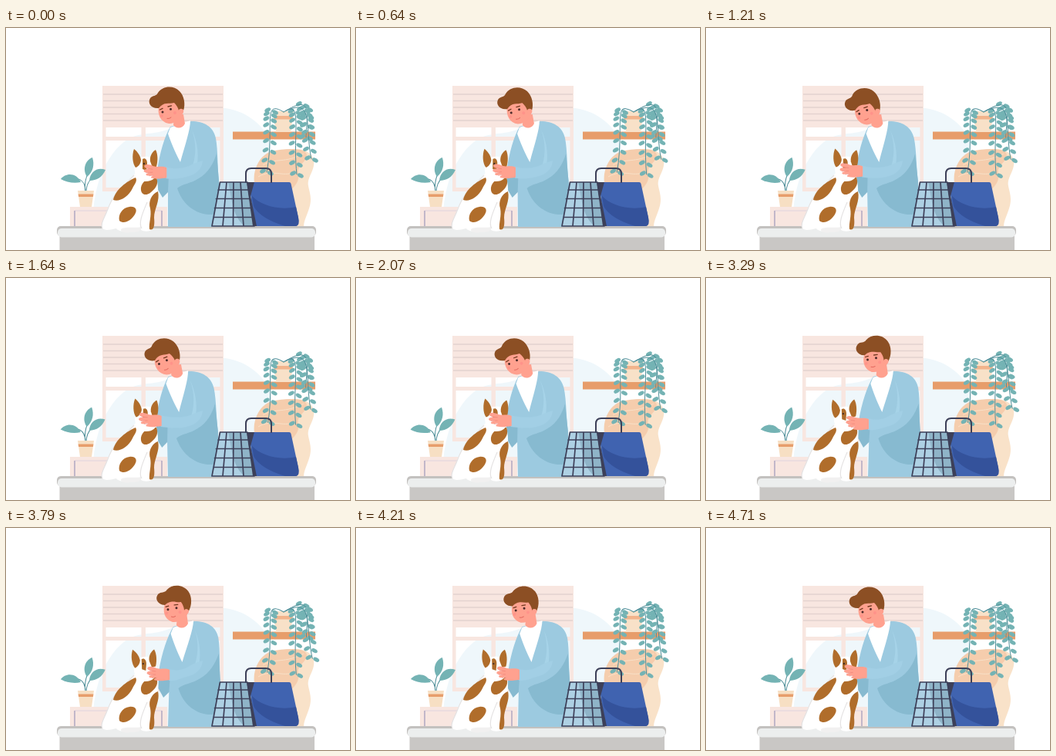
Animation of 446 by 288 pixels, one loop 4.78 s. Source, as an HTML page:

```html
<!DOCTYPE html>
<html lang="en">
<head>
<meta charset="utf-8">
<title>Man petting a dog</title>
<style>
html, body { margin: 0; width: 100%; height: 100%; overflow: hidden; background: #fff; }
svg { display: block; width: 100%; height: 100%; }
.pink { fill: #f8e6e0; }
.teal { fill: #74b3b4; }
.stem { fill: none; stroke: #4f8f99; stroke-width: 1; stroke-linecap: round; }
.coat { fill: #9ccae0; }
.shade { fill: #87bad0; }
.skin { fill: #ffa18f; }
.hair { fill: #8c4f24; }
.brown { fill: #b06d2b; }
.dark { fill: none; stroke: #3d4059; stroke-width: 2; stroke-linecap: round; stroke-linejoin: round; }
</style>
</head>
<body>
<svg viewBox="0 0 446 288">
  <!-- room -->
  <path fill="#eff7fb" d="M112 258C113 218 120 190 135 168C142 157 150 149 160 143C178 134 200 140 220 126C240 110 262 102 284 104C308 107 330 122 340 142C350 170 350 220 346 258Z"/>
  <path class="pink" d="M125 75H282V129H125Z"/>
  <path class="pink" fill-rule="evenodd" d="M125 129H282V212H125ZM129.500 129V141H175.500V129ZM181 129V141H277.500V129ZM129.500 146V207H175.500V146ZM181 146V207H277.500V146Z"/>
  <path stroke="#e4d2cf" stroke-width="1.300" d="M126 86H281M126 94.500H281M126 103H281M126 111.500H281M126 120H281"/>
  <path class="pink" d="M83 232H209V258H83Z"/>
  <path fill="none" stroke="#d9cfdc" stroke-width=".8" d="M89 237H202"/>
  <path fill="none" stroke="#b5acc4" stroke-width="1.600" d="M89 237V258M202 237V258"/>

  <!-- small plant -->
  <g id="plant">
    <path class="stem" d="M103 213C103 203 100 198 94 196M103 213C101 202 104 194 106 189M104 213C104 204 107 199 112 194"/>
    <path class="teal" d="M71 196C77 188 91 187 97 200C88 202 78 200 71 196Z"/>
    <path class="teal" d="M112 168C102 172 99 184 105 193C113 187 115 177 112 168Z"/>
    <path class="teal" d="M129 184C118 180 109 187 108 198C118 198 125 193 129 184Z"/>
  </g>
  <path fill="#f7dfc3" d="M93 211H114L111 232H96Z"/>
  <path fill="#e79d6b" d="M93.600 215.500H113.400L112.900 219H94.100Z"/>

  <!-- shelf corner -->
  <path fill="#f9e2c9" d="M350 160C375 154 396 156 399 172C401 185 390 193 392 205C394 215 397 222 393 234C390 244 386 250 386 258H340Z"/>
  <path fill="#f5cdad" d="M322 200C320 186 327 166 344 160C362 156 388 155 390 164C390 175 376 178 379 190C381 200 372 208 365 214H330Z"/>
  <path fill="none" stroke="#f9e2c9" d="M333 178C348 168 362 176 386 163M327 193C346 182 358 194 374 187"/>
  <path fill="#e79d6b" d="M294 134.500H401V144.500H294Z"/>
  <path fill="#f8e1c8" d="M346 108H373L369 135H350Z"/>
  <path fill="#f2b48c" d="M347 114H372L371.400 118.500H347.700Z"/>
  <g id="vines"></g>

  <!-- table -->
  <path fill="#c9c7c5" d="M69.500 268H400V288H69.500Z"/>
  <rect x="66" y="257" width="336" height="13" rx="5" fill="#c3c1bf"/>

  <!-- man -->
  <g id="body">
    <path class="coat" d="M213 128C206 140 199 162 196 186L197 207L210 213L210 258H277C278 235 277 215 276 198C274 180 275 160 272 143C269 128 257 121 240 121Z"/>
    <path class="shade" d="M196 192L211 190L210 213L203 220L196 208Z"/>
    <path class="shade" d="M273 163C269 176 262 188 250 195C240 202 228 202 222 208C228 226 242 240 262 242H277L276 198Z"/>
    <path fill="#fff" d="M213 129L239 120C239 132 232 152 226 174C219 161 213 146 210 137Z"/>
    <path fill="#a6d3e8" d="M241 132C247 148 247 168 240 184L246 184C251 170 249 148 241 132Z"/>
    <path class="skin" d="M218 113L230 112L232 124C229 131 220 131 217 126Z"/>
    <g id="head">
      <path class="skin" d="M198 101C196 112 200 122 211 124C221 124 230 116 230 105L223 92L203 92Z"/>
      <path class="hair" d="M198 104C188 105 183 97 187 91C190 87 195 89 197 84C203 75 217 74 225 82C231 88 233 99 230 107C228 110 226 110 224 107C223 103 221 100 218 97C211 99 205 95 198 104Z"/>
      <circle class="skin" cx="227" cy="108" r="3.200"/>
      <path fill="none" stroke="#70391f" stroke-width="1.300" stroke-linecap="round" d="M199.500 106L203 104.300M210 102L214.500 100.800"/>
      <g fill="#4c2b2a"><circle cx="203" cy="109" r="1.500"/><circle cx="213.500" cy="105.300" r="1.500"/></g>
      <g fill="#ff938a"><circle cx="202" cy="114" r="1.800"/><circle cx="219" cy="110" r="2"/></g>
      <path fill="none" stroke="#e2695f" stroke-width="1" stroke-linecap="round" d="M209 117.500Q212 118 214 116"/>
    </g>
  </g>
  <rect x="67" y="260" width="334" height="11.500" rx="5" fill="#eceeee"/>

  <!-- dog -->
  <path fill="#fff" d="M168 188C159 199 140 212 132 234C128 246 121 255 125 260C130 264 138 261 143 260C145 265 166 266 174 261C176 264 186 265 190 261L191 240C198 222 199 207 194 190Z"/>
  <path fill="#f1f0f0" d="M149 261C154 257 166 260 175 258C176 263 172 265 162 265C154 266 148 265 149 261Z"/>
  <path fill="none" stroke="#e4e2e2" stroke-width="1.200" d="M166 191C157 201 139 214 132 235C127 248 122 254 125 260M176 260C171 253 178 238 183 226"/>
  <path class="brown" d="M168 194C157 199 142 209 139 223C147 226 159 219 164 208C166 203 171 199 168 194Z"/>
  <path class="brown" d="M175 207C176 199 186 192 195 194C198 202 195 207 188 213C181 219 174 216 175 207Z"/>
  <path class="brown" d="M147 250C145 242 151 233 160 232C168 231 171 236 167 242C162 250 153 255 147 250Z"/>
  <path class="brown" d="M197 212C189 215 184 225 187 234C189 244 185 253 186 261C192 264 193 255 192 246C192 235 200 224 197 212Z"/>
  <g id="dogHead">
    <path fill="#fff" d="M167 178C168 169 175 166 184 167C193 167 197 176 196 184C196 194 190 199 181 199C171 199 165 190 167 178Z"/>
    <path class="brown" d="M166 157C163 165 164 176 168 181C172 180 175 175 175 171C174 165 170 160 166 157Z"/>
    <path class="brown" d="M194 158C189 161 186 167 187 173L190 181L195 180C197 172 197 164 194 158Z"/>
    <path class="brown" d="M177 170C180 168 183 170 183 176L182 185L177 183Z"/>
    <circle cx="179" cy="176" r="1.200" fill="#493128"/>
  </g>

  <!-- petting arm -->
  <path id="sleeve" fill="#a2cfe5"/>
  <g id="hand">
    <path class="skin" d="M208 181C202 178 197 181 191 179C185 176 179 176 179 179.500C180 182 185 182 187 183C183 182.500 177.500 182.500 178.500 186C180 188 185 187 187 187C183 188 179.500 189 182 191C185 192 189 190 191 191C188 192 186.500 194 189 194.500C195 196 202 195 208 194Z"/>
    <path fill="none" stroke="#ee8479" stroke-width=".7" d="M182 182L190 183M181 187.500L190 187M185 191.500L191 191"/>
  </g>

  <!-- carrier -->
  <path fill="#4063b0" d="M315 200H367Q369 200 369.500 202L379 246Q381 256 376 257H322Z"/>
  <path fill="#34529b" d="M319 218C330 230 354 237 376 232L379 246Q381 256 376 257H362C345 252 327 243 321 231Z"/>
  <path fill="#aed1e4" d="M277 200H314L323 257H267Z"/>
  <path fill="#8fb4c8" d="M288 200H314L323 257H309C292 242 293 219 288 200Z"/>
  <path fill="#3d4059" d="M312 200H322L317 218L325 257H320Z"/>
  <path class="dark" d="M311 200V189Q311 182 318 182H337Q344 182 344 189V200"/>
  <path class="dark" stroke-width="1.700" style="stroke-width: 1.7" d="M277.500 200H313L322 257H267ZM286 200L281 257M295 200L294.500 257M304 200L308 257M275 210H314M272.500 221.500H316M270.500 233.500H318M269 245.500H320"/>
</svg>
<script>
const $ = id => document.getElementById(id);
const LOOP = 4780, STEPS = 67;

// Control points of each hanging stem, number of leaf pairs, and sway in degrees.
const vines = [
  { p: [[360, 109], [331, 91], [349, 130], [338, 187]], n: 9, sway: s => -1.6 * s },
  { p: [[360, 109], [386, 91], [371, 135], [377, 190]], n: 9, sway: s => 1.3 * s },
  { p: [[362, 108], [398, 85], [390, 112], [389, 142]], n: 5, sway: (s, lean) => -.1 * lean },
  { p: [[364, 107], [400, 90], [387, 130], [396, 170]], n: 8, sway: (s, lean) => -.14 * lean }
];

function bezier(p, u) {
  const v = 1 - u;
  return [0, 1].map(i => v ** 3 * p[0][i] + 3 * v * v * u * p[1][i] + 3 * v * u * u * p[2][i] + u ** 3 * p[3][i]);
}

$('vines').innerHTML = vines.map(({ p, n }) => {
  let leaves = '';
  for (let i = 0; i < n; i++) {
    const [x, y] = bezier(p, .32 + .68 * i / (n - 1));
    for (const side of [-1, 1])
      leaves += `<ellipse class="teal" rx="4.200" ry="2.500" transform="translate(${x + side * 4.900} ${y + side * 1.500}) rotate(${side * 30})"/>`;
  }
  return `<g>${leaves}<path class="stem" d="M${p[0]}C${p.slice(1)}"/></g>`;
}).join('');

// Eased position between [time, value] keys.
const keys = [[0, 0], [1350, -6], [2000, -6], [3450, 8.5], [3850, 8.5], [4700, 0], [LOOP, 0]];
function leanAt(t) {
  t = (t + LOOP) % LOOP;
  const i = keys.findIndex(k => k[0] > t);
  const [t0, a] = keys[i - 1], [t1, b] = keys[i];
  const u = (t - t0) / (t1 - t0);
  return a + (b - a) * u * u * (3 - 2 * u);
}

const set = (el, transform) => el.setAttribute('transform', transform);

function draw(now) {
  const t = Math.floor(now % LOOP / LOOP * STEPS) * LOOP / STEPS;
  const lean = leanAt(t), reach = leanAt(t - 220);
  const swell = (1 - Math.cos(2 * Math.PI * t / LOOP)) / 2;
  const skew = lean * .0035;

  set($('body'), `matrix(1 0 ${-skew} 1 ${258 * skew} 0)`);
  set($('head'), `rotate(${lean} 226 124)`);
  set($('dogHead'), `rotate(${lean * -.3} 182 200)`);
  set($('plant'), `rotate(${-1.3 * swell} 103 212)`);

  const dx = reach * (reach < 0 ? 1.05 : .5), dy = reach * .35;
  const x = 207 + dx, y = 187 + dy;
  set($('hand'), `translate(${dx} ${dy})`);
  $('sleeve').setAttribute('d', `M${x} ${y - 7}C${x + 14} ${y - 3} 233 182 243 176L255 172C254 184 246 190 234 193C224 196 ${x + 9} ${y + 9} ${x} ${y + 8}Z`);

  vines.forEach(({ p, sway }, i) => set($('vines').children[i], `rotate(${sway(swell, lean)} ${p[0]})`));
  requestAnimationFrame(draw);
}
requestAnimationFrame(draw);
</script>
</body>
</html>
```
